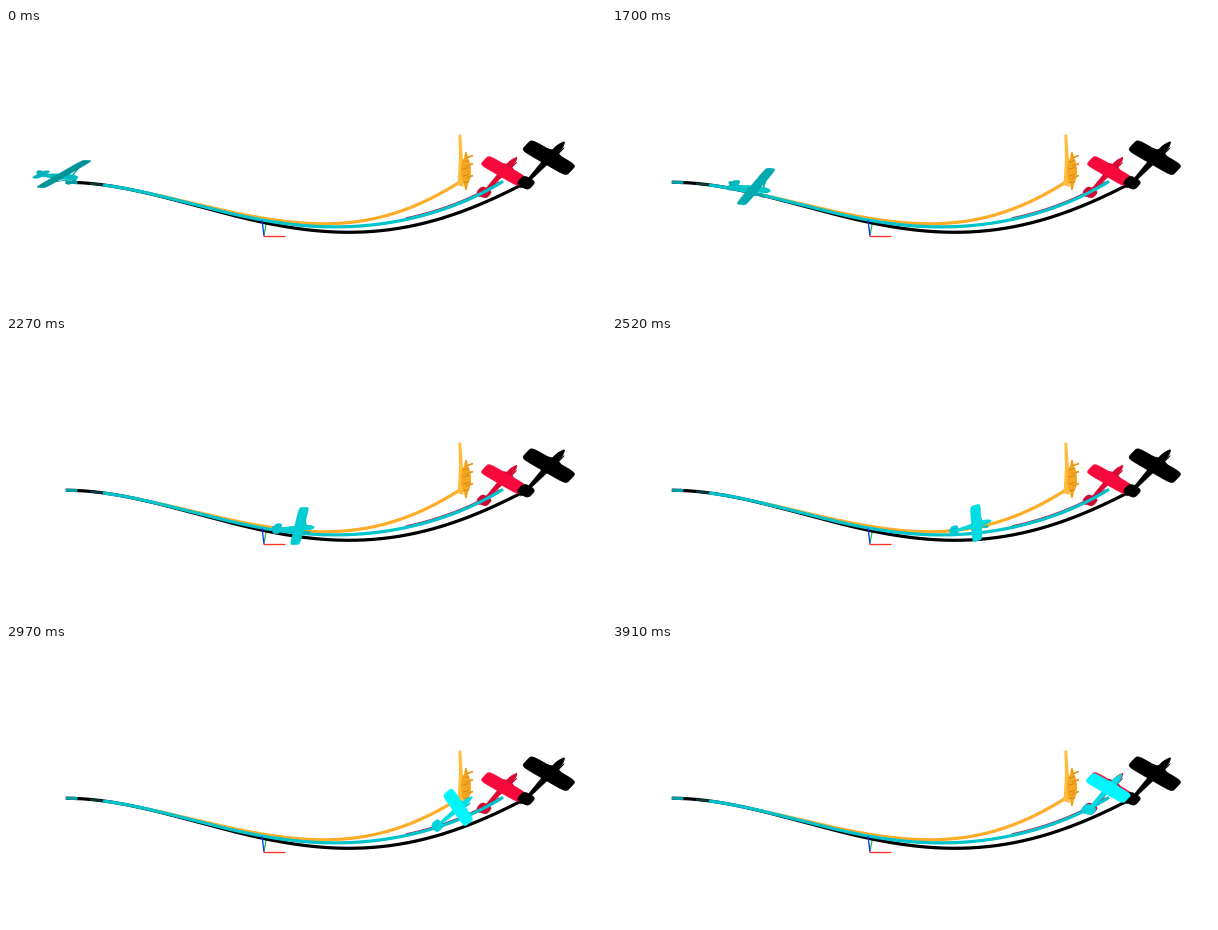
Write a matplotlib script that moves like this. It is 600 by 280 pixels and loops after 4510 ms.

```python
import numpy as np
import matplotlib.pyplot as plt
from matplotlib.animation import FuncAnimation
from matplotlib.patches import Ellipse, Polygon

W, H, DPI = 600, 280, 100
PX = 72 / DPI
LOOP, TICK = 4510, 10
START, STEP, LAST = 1360, 100 / 3, 66

CYAN, RED, BLACK = (0, 0.97, 1), (0.97, 0.04, 0.23), (0, 0, 0)
AMBER, LINE = "#ffad29", "#00c3cc"

# flight: centre and screen angles of nose, right wing and mast at a few steps
KEY = np.array([-1, 10, 27, 40, 56, LAST])
FLIGHT = np.array([
    [58, 144, 293.5, 403.5, 484, 496.3],
    [146, 158.5, 190, 181, 147, 144],
    [4, 8, -3, -25, -50, -47],
    [150, 130, 104, 75, 39, 30],
    [262, 253, 236, 215, 160, 150],
]).T
SLOPES = np.gradient(FLIGHT, KEY, axis=0)
SLOPES[-1] = 0


def flight_at(n):
    """Cubic Hermite blend of the key poses."""
    i = min(np.searchsorted(KEY, n, side="right") - 1, len(KEY) - 2)
    d = KEY[i + 1] - KEY[i]
    s = (n - KEY[i]) / d
    ease = s * s * (3 - 2 * s)
    return (FLIGHT[i] * (1 - ease) + FLIGHT[i + 1] * ease
            + d * s * (1 - s) * ((1 - s) * SLOPES[i] - s * SLOPES[i + 1]))


def axes_for(angles):
    """Projected forward, span and up vectors, foreshortened by their angle."""
    a = np.radians(angles)
    c, s = np.cos(a), np.sin(a)
    size = np.array([30 + 17 * s[0] ** 2,
                     18 + 9 * c[1] ** 2 - 3 * c[1],
                     9 + 13 * s[2] ** 2])
    return size[:, None] * np.column_stack([c, s])


def in_3d(x, y=0, z=0):
    return np.column_stack(np.broadcast_arrays(x, y, z))


def rounded(rx, ry, power):
    """Superellipse outline; small powers give square corners."""
    a = np.linspace(0, 2 * np.pi, 48, endpoint=False)
    c, s = np.cos(a), np.sin(a)
    return (rx * np.sign(c) * np.abs(c) ** power,
            ry * np.sign(s) * np.abs(s) ** power)


def body():
    """Tapered outline: narrow tail, full cabin, blunt nose."""
    x = np.linspace(-0.9, 0.44, 40)
    r = 0.04 + 0.09 * np.clip((x + 0.9) / 0.8, 0, 1)
    r *= 1 - 0.8 * np.clip((x - 0.2) / 0.24, 0, 1) ** 2
    return np.r_[x, x[::-1]], np.r_[r, -r[::-1]]


def build_parts():
    """Pairs of shape and shade, back to front; the wing has no shade."""
    parts = []
    for side in (-1, 1):
        t = np.array([0, 0, 1, 1])
        dx = np.array([0, 0.04, 0.04, 0])
        parts.append((in_3d(0.06 + dx + 0.05 * t, side * (0.55 - 0.48 * t), -0.24 * t), 0.85))
        wx, wz = rounded(0.08, 0.08, 1)
        parts.append((in_3d(0.2 + wx, side * 0.12, wz - 0.31), 0.85))
    x, r = body()
    tx, ty = rounded(0.13, 0.27, 0.6)
    fx, fz = rounded(0.11, 0.11, 0.8)
    wx, wy = rounded(0.165, 1, 0.3)
    return parts + [
        (in_3d(tx - 0.77, ty, -0.1), 0.95),
        (in_3d(x, 0, r - 0.13), 1),
        (in_3d(x, r, -0.13), 1),
        (in_3d(fx - 0.8, 0, fz - 0.03), 0.93),
        (in_3d(wx, wy), None),
    ]


PARTS = build_parts()


class Plane:
    def __init__(self, ax, color, z):
        self.color = np.array(color)
        self.patches = [ax.add_patch(Polygon(shape[:, :2], lw=0.4 * PX, zorder=z))
                        for shape, _ in PARTS]

    def place(self, center, axes, wing=1, hull=0.88):
        for patch, (shape, shade) in zip(self.patches, PARTS):
            light = hull * shade if shade else wing
            patch.set_xy(center + shape @ axes)
            patch.set_color(self.color * light)


fig = plt.figure(figsize=(W / DPI, H / DPI), dpi=DPI, facecolor="white")
ax = fig.add_axes([0, 0, 1, 1])
ax.set_xlim(0, W)
ax.set_ylim(H, 0)
ax.axis("off")


def stroke(xs, ys, color, width=3.2, z=4):
    ax.plot(xs, ys, color=color, lw=width * PX, zorder=z, solid_capstyle="butt")


def path(*points):
    """Smooth curve through the shared launch and the given points."""
    launch = [(60, 154.3), (78, 154.8), (97, 157), (150, 167.2)]
    x, y = np.array(launch + list(points)).T
    fit = np.poly1d(np.polyfit((x - 300) / 250, y, 6))
    return lambda xs: fit((xs - 300) / 250)


def trace(curve, x0, x1, color, z, width=3.2, dy=0):
    xs = np.linspace(x0, x1, 160)
    stroke(xs, curve(xs) + dy, color, width, z)


# coordinate axes
stroke([257, 279], [208, 208], "#ff3020", 1.3, 2)
stroke([258, 260.5], [207, 194], "#20c040", 1.3, 2)
stroke([258, 256], [208, 192], "#1030ff", 1.3, 6)

# flight paths
low = path((200, 180.3), (257, 194.5), (300, 201.5), (345, 204.3), (430, 192), (470, 178), (521, 154))
high = path((200, 178), (257, 190.3), (318, 196), (350, 193.6), (390, 184.5), (420, 173), (460, 150))
mid = path((200, 179.2), (257, 192.2), (330, 199), (400, 191.3), (440, 180.5), (470, 168), (497, 153.3))
trace(low, 60, 521, "black", 3)
trace(high, 150, 460, AMBER, 4)
trace(mid, 400, 494, "#c0164a", 4.5, dy=-0.6)
trace(mid, 97, 497, LINE, 5)
trace(mid, 59.5, 71.5, "#0a9ba5", 5)
trace(mid, 84, 97, "#063b40", 5, 2.2)

# parked planes
parked = axes_for(FLIGHT[-1, 2:])
Plane(ax, RED, 3.5).place((497.5, 143), parked)
Plane(ax, BLACK, 3.6).place((542.8, 129.7), parked * 1.17)

# the amber plane, seen edge-on
wing = [(452.4, 106.5), (455.2, 106.5), (457, 132), (457.5, 159), (451.5, 157), (453, 130)]
ax.add_patch(Polygon(wing, fc="#ffbd3e", lw=0, zorder=7))
for height, width, color in ((39, 5, "#f0a018"), (28, 10, "#f5a623")):
    ax.add_patch(Ellipse((460, 143), width, height, fc=color, lw=0, zorder=7))
for y in (130, 138, 150):
    stroke([460, 467], [y, y - 2.5], "#e39a1c", 1.8, 7)
for y in range(134, 157, 7):
    stroke([457, 463], [y, y - 1.5], "#cf8810", 0.9, 8)

flyer = Plane(ax, CYAN, 9)


def draw(frame):
    t = frame * TICK
    n = min(round((t - START) / STEP), LAST) if t >= START else -1
    pose = flight_at(n)
    sun = min((n + 1) / 50, 1)
    flyer.place(pose[:2], axes_for(pose[2:]), 0.6 + 0.4 * sun, 0.76 + 0.14 * sun)
    return flyer.patches


anim = FuncAnimation(fig, draw, frames=LOOP // TICK, interval=TICK,
                     repeat=True, repeat_delay=0, blit=False)
plt.show()
```
